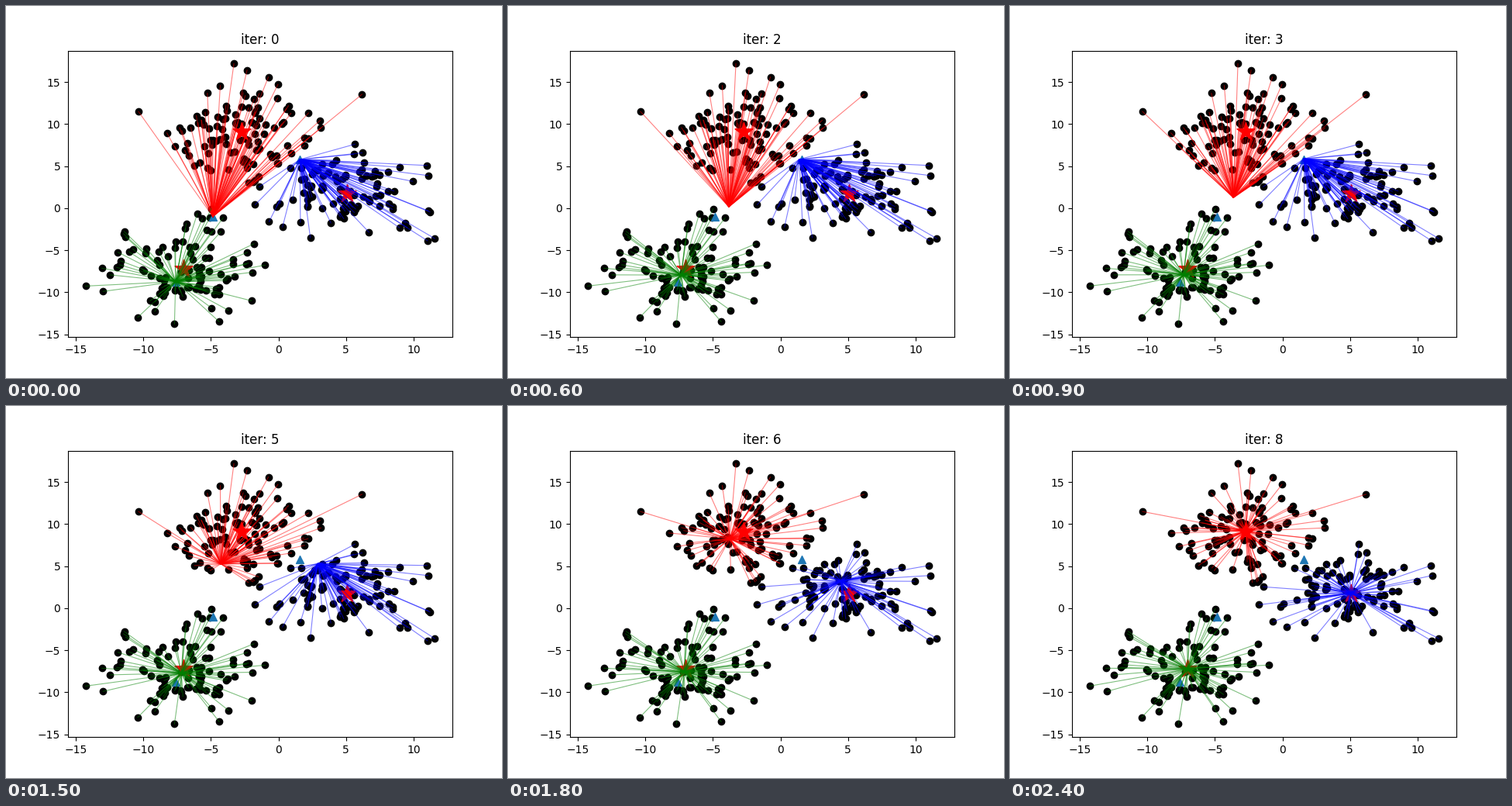
A matplotlib script that plays this animation: 640x480 px, repeating every 2.7 s.

```python
import numpy as np
import matplotlib.pyplot as plt
from matplotlib.animation import FuncAnimation

STEPS = 9
COLORS = "rbg"

rng = np.random.RandomState(42)
blob_centers = rng.uniform(-10, 10, (3, 2))
points = np.concatenate([rng.normal(c, 3.0, (100, 2)) for c in blob_centers])
start = np.array([[-4.87, -0.99], [1.58, 5.78], [-7.62, -8.74]])


def nearest(centers):
    return np.linalg.norm(points[:, None] - centers, axis=2).argmin(axis=1)


def kmeans_step(centers):
    labels = nearest(centers)
    return np.array([points[labels == k].mean(axis=0) for k in range(3)])


history = [start]
for _ in range(30):
    history.append(kmeans_step(history[-1]))
final = history[-1]
labels = nearest(final)

fig, ax = plt.subplots(figsize=(6.4, 4.8), dpi=100)
ax.scatter(*points.T, c="k")
ax.scatter(*start.T, marker="^", s=50)
ax.scatter(*final.T, marker="*", s=300, c="r")
spokes = [ax.plot([], [], c=COLORS[k], lw=0.8, alpha=0.5)[0] for k in labels]
title = ax.set_title("")


def update(step):
    centers = history[step]
    for line, point, k in zip(spokes, points, labels):
        line.set_data(*zip(point, centers[k]))
    title.set_text(f"iter: {step}")
    return [*spokes, title]


anim = FuncAnimation(fig, update, frames=STEPS, interval=300, repeat=True, repeat_delay=0)
plt.show()
```
